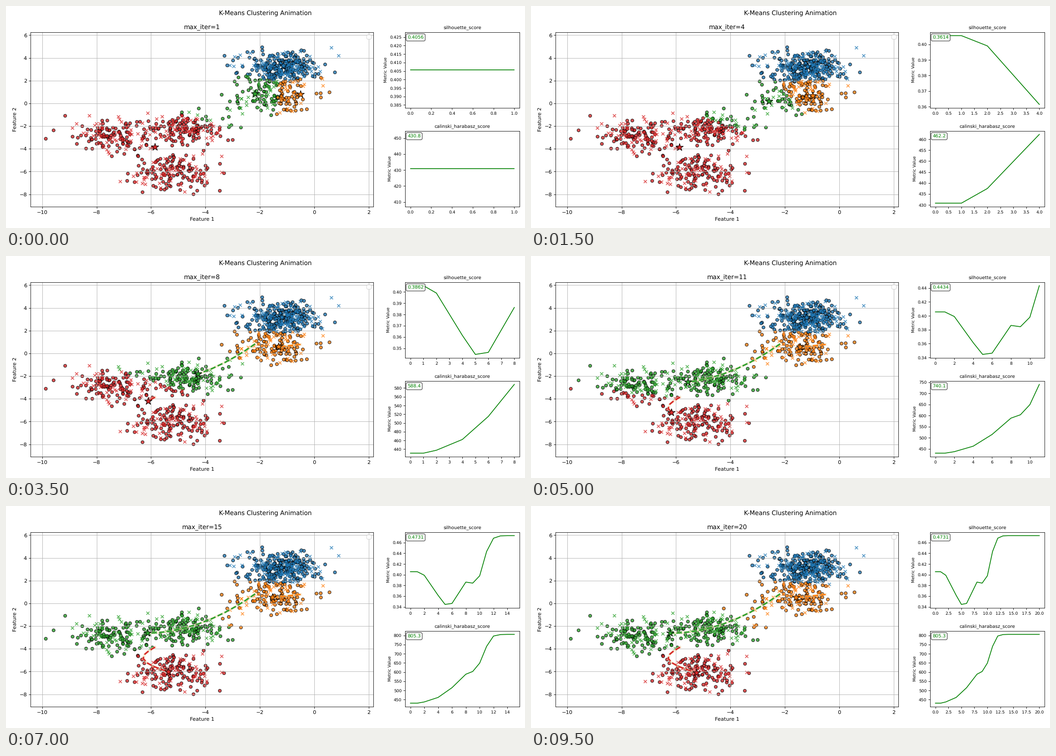
A matplotlib script for the animation above (10000 ms loop, 1143 by 490 pixels).

```python
import numpy as np
import matplotlib.pyplot as plt
from matplotlib.animation import FuncAnimation

W, H, DPI = 1143, 490, 81.64
FRAMES, INTERVAL = 20, 500
COLORS = np.array(["tab:blue", "tab:orange", "tab:green", "tab:red"])
STEPS = np.arange(FRAMES + 1)

plt.rcParams.update({"font.family": "DejaVu Sans", "text.hinting": "none"})

# Blobs: centre, spread, number of points
BLOBS = [
    ((-1.20, 3.13), (0.75, 0.66), 330),
    ((-1.45, 0.60), (0.85, 0.75), 165),
    ((-4.60, -2.30), (0.70, 0.66), 165),
    ((-7.35, -2.75), (0.90, 0.68), 165),
    ((-5.15, -6.15), (0.82, 0.72), 165),
]

# Metric readings at the iterations where the curves bend
SILHOUETTE = {1: .4056, 2: .3990, 4: .3614, 5: .3445, 6: .3463, 8: .3862,
              9: .3843, 10: .3980, 11: .4434, 12: .4683, 13: .4726, 14: .4731}
CALINSKI = {1: 430.8, 2: 437.5, 4: 462.2, 6: 515, 8: 588.4, 9: 603.5,
            10: 649, 11: 740.1, 12: 796.5, 13: 804.3, 14: 805.3}
CALINSKI = {1: 430.8, **CALINSKI}


def make_points():
    rng = np.random.default_rng(12)
    train, test = [], []
    for center, spread, count in BLOBS:
        z = rng.normal(size=(count, 2)).clip(-2.8, 2.8)
        points = center + z * spread
        split = int(count * 0.7)
        train.append(points[:split])
        test.append(points[split:])
    return rng.permutation(np.vstack(train)), rng.permutation(np.vstack(test))


def logistic(n, middle, width):
    return 1 / (1 + np.exp((middle - n) / width))


def centroid_track():
    n = STEPS[1:]
    settle = 1 - np.exp(-(n - 1) / 5.5)
    sweep = logistic(n, 7.75, 1.95)
    drop = logistic(n, 10.4, 1.45)
    blue = (-1.13 - 0.08 * settle, 3.30 - 0.18 * settle)
    orange = (-0.50 - 1.12 * settle, 0.78 - 0.28 * settle)
    green = (-2.05 - 4.17 * sweep, 1.05 - 3.67 * (1 - (1 - sweep) ** 2))
    red = (-5.85 + 0.61 * drop - 0.72 * np.sin(np.pi * drop), -3.85 - 2.27 * drop)
    return np.array([blue, orange, green, red]).transpose(2, 0, 1)


def metric_curve(readings):
    return np.interp(STEPS, list(readings), list(readings.values()))


def labels(points, centers):
    gaps = points[:, None] - centers
    return (gaps ** 2).sum(axis=2).argmin(axis=1)


def add_axes(left, top, right, bottom):
    return fig.add_axes([left / W, 1 - bottom / H,
                         (right - left) / W, (bottom - top) / H])


def metric_panel(top, title, readings, fmt):
    ax = add_axes(879.2, top, 1130.9, top + 167)
    ax.set_title(title, fontsize=9)
    ax.set_ylabel("Metric Value", fontsize=8)
    ax.tick_params(labelsize=8)
    line, = ax.plot([], [], color="green", lw=1.5)
    text = ax.text(0.02, 0.96, "", transform=ax.transAxes, fontsize=9,
                   color="green", va="top",
                   bbox=dict(boxstyle="round,pad=0.3", facecolor="white",
                             edgecolor="black", alpha=0.8))
    values = metric_curve(readings)

    def show(n):
        line.set_data(STEPS[:n + 1], values[:n + 1])
        ax.relim()
        ax.autoscale_view()
        text.set_text(format(values[n], fmt))

    return show


train, test = make_points()
track = centroid_track()

# The tiny margin keeps the pixel size from being rounded down
fig = plt.figure(figsize=((W + 1e-6) / DPI, (H + 1e-6) / DPI), dpi=DPI)
fig.suptitle("K-Means Clustering Animation", fontsize=12)

main = add_axes(54.1, 57.8, 809.2, 442.8)
main.set(xlim=(-10.43, 2.175), ylim=(-9.085, 6.26),
         xlabel="Feature 1", ylabel="Feature 2")
main.grid(True)
main.legend([], [], loc="upper right")

circles = main.scatter(*train.T, s=36, edgecolors="black", linewidths=1, alpha=0.8)
crosses = main.scatter(*test.T, s=36, marker="x", linewidths=1.5, alpha=0.75)
glows = [main.plot([], [], color="wheat", lw=5, alpha=0.5)[0] for _ in COLORS]
trails = [main.plot([], [], "--", color=c, lw=2.8)[0] for c in COLORS]
stars = main.scatter(*track[0].T, s=225, marker="*", c=COLORS,
                     edgecolors="black", linewidths=1, zorder=3)

panels = [metric_panel(57.8, "silhouette_score", SILHOUETTE, ".4f"),
          metric_panel(275.8, "calinski_harabasz_score", CALINSKI, ".1f")]


def update(frame):
    n = frame + 1
    centers = track[frame]
    main.set_title(f"max_iter={n}", fontsize=12)
    circles.set_facecolor(COLORS[labels(train, centers)])
    crosses.set_color(COLORS[labels(test, centers)])
    stars.set_offsets(centers)
    shown = n if n >= 5 else 0
    for k, pair in enumerate(zip(glows, trails)):
        for line in pair:
            line.set_data(*track[:shown, k].T)
    for show in panels:
        show(n)


anim = FuncAnimation(fig, update, frames=FRAMES, interval=INTERVAL,
                     init_func=lambda: update(0), repeat=True, repeat_delay=0)
plt.show()
```
